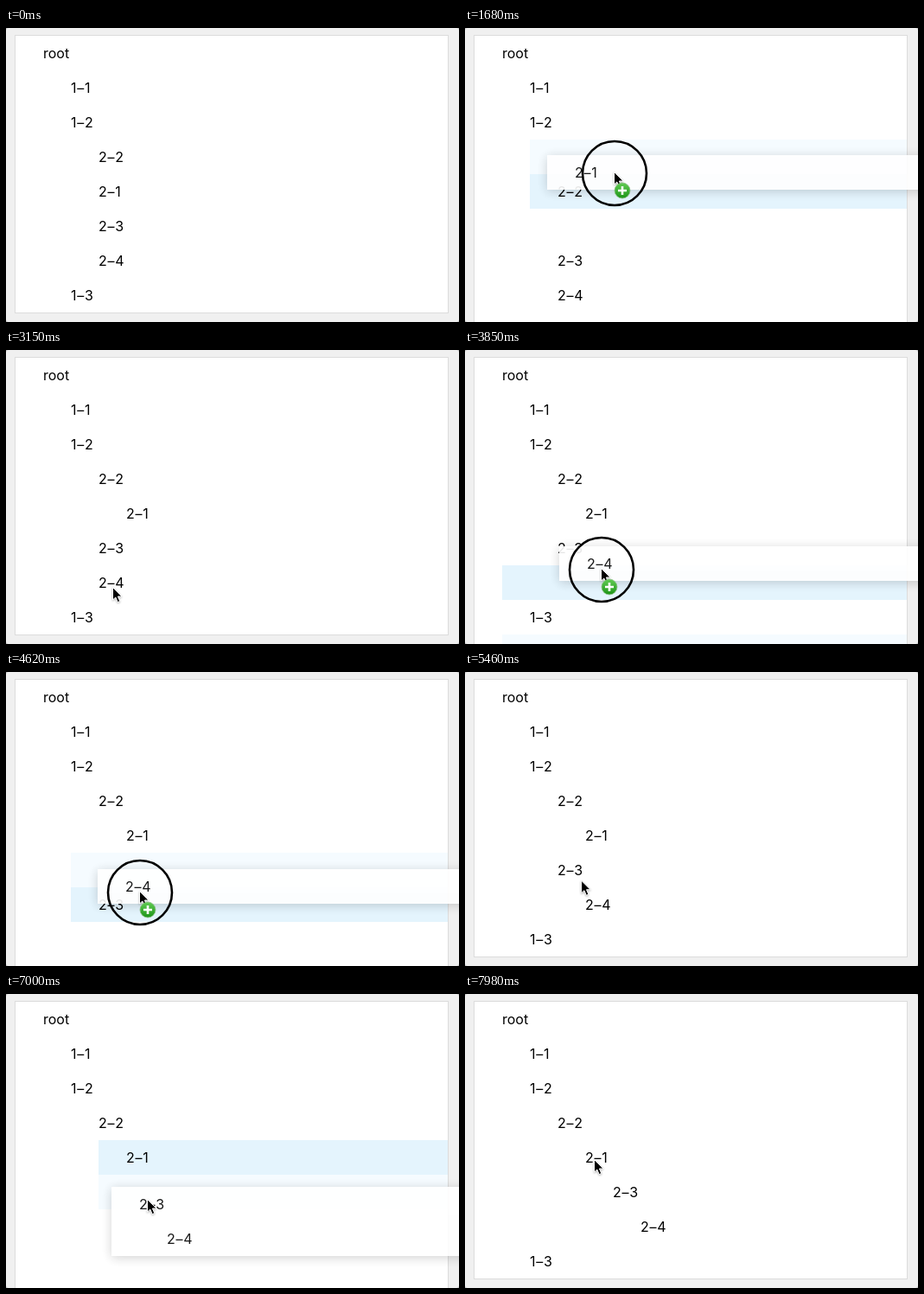
Recreate the animation shown at these times as an HTML page. Size 524 px wide and 340 px high, loop 8000 ms.

```html
<!DOCTYPE html>
<html lang="en">
<head>
<meta charset="utf-8">
<title>Tree drag and drop</title>
<style>
  html, body { margin: 0; width: 100%; height: 100%; overflow: hidden; background: #b8b8b8; }
  #stage { position: relative; width: 524px; height: 340px; overflow: hidden; border-radius: 3px;
    background: #f0f0f0; font: 16px/40px Inter, sans-serif; font-feature-settings: "calt" 0; color: #000; }
  #stage > * { position: absolute; left: 0; top: 0; }
  #panel { left: 10px !important; top: 8px !important; width: 500px; background: #fff; border: 1px solid #dcdcdc; }
  .mark { height: 40px; background: #e4f4fd; }
  .pale { background: #f5fbff; }
  .row { white-space: nowrap; }
  .row ~ .row, #item { letter-spacing: .7px; }
  #item { width: 600px; background: #fff; opacity: .9; box-shadow: 0 2px 12px rgba(0, 0, 0, .2); }
  #item div { padding-left: 32px; height: 40px; }
  #item div + div { padding-left: 64px; }
  #pointer { overflow: visible; }
  #arrow { filter: drop-shadow(0 1px 1px rgba(0, 0, 0, .3)); }
</style>
</head>
<body>
<div id="stage">
  <div id="panel"></div>
  <div id="gap" class="mark pale"></div>
  <div id="hover" class="mark"></div>
</div>
<script>
const LOOP = 8000, STEP = 70, MOVE = 210, RELEASE = 280;
const ROW = 40, INDENT = 32, LEFT = 43, TOP = 9;
const $ = id => document.getElementById(id);
const stage = $('stage');

const nodes = [
  ['root', 0], ['1–1', 1], ['1–2', 1], ['2–2', 2],
  ['2–1', 2], ['2–3', 2], ['2–4', 2], ['1–3', 1]
].map(([label, depth]) => ({ label, depth }));

// stops: where the gap opens (slot), which row lights up and from which depth.
// lag: how much later the rows below the lifted ones react.
const drags = [
  { ready: 980, lift: 1260, drop: 2380, rows: [4], gain: 1, lag: 0,
    grab: [152, 188], via: [[1680, 172, 166], [2100, 165, 204]],
    stops: [{ at: 1330, slot: 3, row: 3, depth: 1 }, { at: 1820, slot: 4, row: 3, depth: 1 }] },
  { ready: 3150, lift: 3500, drop: 5040, rows: [6], gain: 1, lag: 0,
    grab: [123, 274], via: [[3850, 157, 252], [4620, 154, 253], [4970, 158, 264]],
    stops: [{ at: 3500, slot: 8, row: 6, depth: 0 }, { at: 4340, slot: 5, row: 5, depth: 1 },
            { at: 4760, slot: 6, row: 5, depth: 1 }] },
  { ready: 5810, lift: 6230, drop: 7280, rows: [5, 6], gain: 2, lag: 280,
    grab: [116, 223], via: [[6510, 158, 203], [6860, 163, 237]],
    stops: [{ at: 6300, slot: 4, row: 4, depth: 2 }, { at: 6580, slot: 5, row: 4, depth: 2 }] }
];

const path = [
  [0, 245, 340], [350, 197, 215],
  ...drags.flatMap(d => [
    [d.ready, ...d.grab], [d.lift, ...d.grab], ...d.via, [d.drop, ...d.via.at(-1).slice(1)]
  ]),
  [7980, 149, 191]
];

const ease = p => {
  p = Math.min(1, Math.max(0, p));
  return p * p * (3 - 2 * p);
};

function cursorAt(t) {
  const i = path.findIndex(k => k[0] > t);
  if (i < 0) return path.at(-1).slice(1);
  const [t0, x0, y0] = path[i - 1], [t1, x1, y1] = path[i];
  const e = ease((t - t0) / (t1 - t0));
  return [x0 + (x1 - x0) * e, y0 + (y1 - y0) * e];
}

// Top of a row, pushed down by any gap open above it.
function topOf(i, t) {
  let open = 0;
  for (const d of drags) {
    const lag = i > d.rows.at(-1) ? d.lag : 0;
    let pushed = 0;
    const turn = (at, on) => {
      open += (on - pushed) * ease((t - at) / MOVE);
      pushed = on;
    };
    for (const s of d.stops) turn(s.at + lag, Number(i >= s.slot));
    turn(d.drop, 0);
  }
  return TOP + ROW * (i + open);
}

// Left edge of a row, deeper after each drop.
function leftOf(i, t) {
  const gained = drags.filter(d => d.rows.includes(i) && t >= d.drop).reduce((n, d) => n + d.gain, 0);
  return LEFT + INDENT * (nodes[i].depth + gained);
}

const show = (el, on) => { el.style.display = on ? '' : 'none'; };
const move = (el, x, y) => { el.style.transform = `translate(${x}px, ${y}px)`; };

function add(parent, text, name = '') {
  const el = document.createElement('div');
  el.className = name;
  el.textContent = text;
  parent.append(el);
  return el;
}

for (const node of nodes) node.el = add(stage, node.label, 'row');
const item = add(stage, '');
item.id = 'item';
const lines = [add(item, ''), add(item, '')];

stage.insertAdjacentHTML('beforeend', `
<svg id="pointer" width="1" height="1">
  <defs><linearGradient id="green" x2="0" y2="1">
    <stop stop-color="#62cc55"/><stop offset="1" stop-color="#1c9417"/>
  </linearGradient></defs>
  <path id="arrow" d="M.5 .5V15L3.8 12L6.2 17.6L8.8 16.5L6.4 11H11Z" fill="#000" stroke="#fff"/>
  <g id="press">
    <circle cx="1" cy="2" r="37" fill="none" stroke="#000" stroke-width="2.6"/>
    <circle cx="10" cy="22" r="9" fill="url(#green)" stroke="#8fbf88" stroke-width=".8"/>
    <path d="M5 22H15M10 17V27" stroke="#fff" stroke-width="2.6"/>
  </g>
</svg>`);

function drawDrag(drag, t, cx, cy) {
  const first = drag.rows[0];
  move(item, leftOf(first, t) - INDENT + cx - drag.grab[0], TOP + ROW * first + cy - drag.grab[1]);
  lines.forEach((el, k) => {
    const i = drag.rows[k];
    show(el, i !== undefined);
    if (i !== undefined) el.textContent = nodes[i].label;
  });
}

function drawMarks(stop, t) {
  const x = LEFT + INDENT * stop.depth;
  for (const el of [$('gap'), $('hover')]) el.style.width = 511 - x + 'px';
  move($('gap'), x, TOP + ROW * stop.slot);
  move($('hover'), x, topOf(stop.row, t));
}

function draw(t) {
  const drag = drags.find(d => t >= d.lift && t < d.drop);
  const stop = drag && drag.stops.filter(s => t > s.at + MOVE).at(-1);
  const [cx, cy] = cursorAt(t);

  $('panel').style.height = topOf(nodes.length, t) - 9 + 'px';
  nodes.forEach(({ el }, i) => {
    move(el, leftOf(i, t), topOf(i, t));
    show(el, !drag || !drag.rows.includes(i));
  });

  show($('gap'), stop);
  show($('hover'), stop);
  if (stop) drawMarks(stop, t);

  show(item, drag);
  if (drag) drawDrag(drag, t, cx, cy);

  move($('pointer'), cx, cy);
  show($('pointer'), t >= STEP);
  show($('press'), drag && t < drag.drop - RELEASE);
}

const start = performance.now();
function tick() {
  const t = (performance.now() - start) % LOOP;
  draw(Math.floor(t / STEP) * STEP);
  requestAnimationFrame(tick);
}
tick();
</script>
</body>
</html>
```
